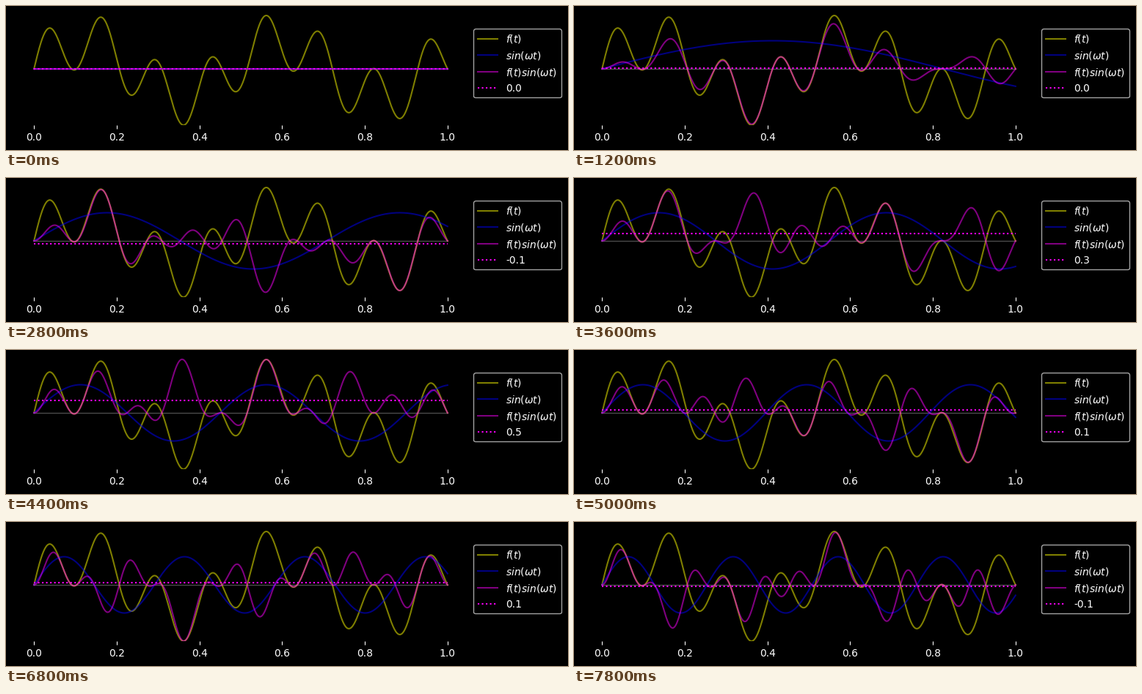
A matplotlib script that plays this animation: 766x197 px, repeating every 8 s.

```python
import numpy as np
import matplotlib.pyplot as plt
from matplotlib.animation import FuncAnimation

plt.style.use("dark_background")

W, H, DPI = 766, 197, 100
FRAMES, INTERVAL = 40, 200
STEP = 20 * np.pi / 99  # growth of omega per frame

t = np.linspace(0, 1, 1000)
f = np.sin(2 * np.pi * 2.1 * t) + np.sin(2 * np.pi * 7.6 * t)

fig = plt.figure(figsize=(W / DPI, H / DPI), dpi=DPI)
ax = fig.add_axes([10 / W, 34 / H, 620 / W, 154 / H], frameon=False)
ax.set_xlim(-0.05, 1.05)
ax.set_ylim(-2, 2)
ax.set_yticks([])
ax.set_xticks(np.linspace(0, 1, 6))

ax.plot([0, 1], [0, 0], color="white", alpha=0.3, lw=1)
ax.plot(t, f, color="yellow", alpha=0.5, label="$f(t)$")
wave, = ax.plot(t, 0 * t, color="blue", alpha=0.5, label=r"$sin(\omega t)$")
product, = ax.plot(t, 0 * t, color="magenta", alpha=0.5,
                   label=r"$f(t)sin(\omega t)$")
mean, = ax.plot([0, 1], [0, 0], ":", color="magenta", label="0.0")
legend = ax.legend(loc="upper left", bbox_to_anchor=(1, 0.9))
mean_text = legend.get_texts()[3]


def update(i):
    s = np.sin(STEP * i * t)
    m = np.mean(f * s)
    wave.set_ydata(s)
    product.set_ydata(f * s)
    mean.set_ydata([m, m])
    mean_text.set_text(f"{m:.1f}")
    return wave, product, mean, mean_text


anim = FuncAnimation(fig, update, frames=FRAMES, interval=INTERVAL,
                     repeat=True, repeat_delay=0)
plt.show()
```
